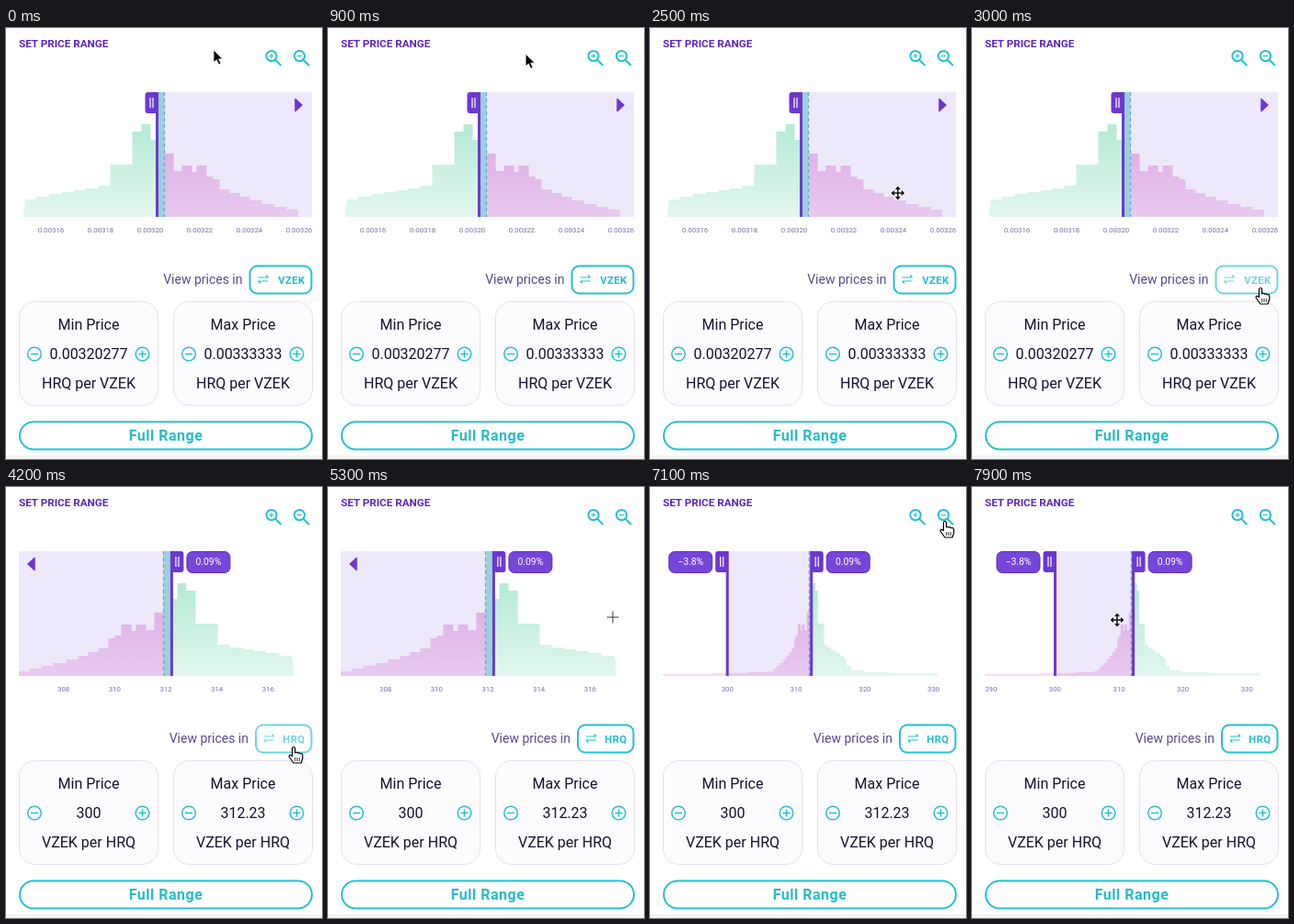
An HTML page that plays this animation: 344x470 px, repeating every 8000 ms.

```html
<!DOCTYPE html>
<html lang="en">
<head>
<meta charset="utf-8">
<title>Price range</title>
<style>
html, body { margin: 0; width: 100%; height: 100%; overflow: hidden; background: #fff; }
svg { display: block; width: 344px; height: 470px; font-family: Roboto, "Open Sans", sans-serif; }
.mid { text-anchor: middle; }
.end { text-anchor: end; }
.teal { fill: none; stroke: #25c0cf; stroke-width: 2; }
.card { fill: #fcfbfe; stroke: #e5e2ec; }
.ink { fill: #17122b; font-size: 16px; text-anchor: middle; }
.tick { fill: #7c6aa8; font-size: 7.8px; text-anchor: middle; }
.accent { fill: #24bccb; font-weight: 700; }
.grip { fill: #6c38cf; }
.tip { fill: #7645d9; stroke: #5a2cb8; }
</style>
</head>
<body>
<svg viewBox="0 0 344 470">
  <defs>
    <linearGradient id="green" gradientUnits="userSpaceOnUse" x1="0" y1="100" x2="0" y2="206">
      <stop stop-color="#b2e9d3"/><stop offset="1" stop-color="#e3f7ee"/>
    </linearGradient>
    <linearGradient id="pink" gradientUnits="userSpaceOnUse" x1="0" y1="130" x2="0" y2="206">
      <stop stop-color="#edbfe6"/><stop offset="1" stop-color="#f8dcf2"/>
    </linearGradient>
    <clipPath id="plot"><rect x="14" y="66" width="319" height="160"/></clipPath>
    <clipPath id="bars"><rect id="barsBox" y="70" width="299" height="136"/></clipPath>
  </defs>
  <rect width="344" height="470" fill="#fff"/>
  <rect y="466" width="344" height="4" fill="#f5f5f6"/>
  <text x="14" y="21" font-size="11.7" font-weight="700" fill="#5d25c6">SET PRICE RANGE</text>
  <g id="lenses" class="teal"></g>
  <g clip-path="url(#plot)">
    <g clip-path="url(#bars)">
      <path id="greenBars" fill="url(#green)"/>
      <path id="pinkBars" fill="url(#pink)"/>
    </g>
    <rect id="range" y="70" height="136" fill="#7645d9" opacity=".12"/>
    <rect id="band" y="70" height="136" fill="#9bd1da"/>
    <line id="current" y1="70" y2="206" stroke="#5fa9cf" stroke-width="1.2" stroke-dasharray="4 3"/>
    <g id="axis"></g>
  </g>
  <g id="handles"></g>
  <text id="viewText" class="end" y="279" font-size="14" fill="#5a4990">View prices in</text>
  <g id="toggle">
    <rect id="toggleBox" class="teal" y="259.5" height="30" rx="8" fill="#fff"/>
    <path id="toggleIcon" d="M0 272H11M8.5 269.5L11 272M11 276H0M2.5 278.5L0 276" class="teal" style="stroke-width:1.2"/>
    <text id="toggleText" class="end accent" x="325.5" y="278.5" font-size="11.3" letter-spacing=".4"></text>
  </g>
  <g id="cards"></g>
  <rect class="teal" x="15" y="429.5" width="318" height="30" rx="15"/>
  <text class="mid accent" x="174" y="450" font-size="16" letter-spacing=".5">Full Range</text>
  <g id="pointer"></g>
</svg>
<script>
const LOOP = 8000, FRAME = 100, SWITCH = 3600;
const LEFT = 14, RIGHT = 333, TOP = 70, BASE = 206, CENTER = 174;
const ZOOMS = [6200, 6900], ZOOM_TIME = 250;
const COIN = "HRQ", CASH = "VZEK";
const $ = id => document.getElementById(id);
const set = (id, attrs) => { for (const k in attrs) $(id).setAttribute(k, attrs[k]); };
const clamp = (v, a = 0, b = 1) => Math.min(b, Math.max(a, v));
const smooth = p => p * p * (3 - 2 * p);

// Liquidity steps: distance from the current price, then bar height
const GREEN = [[0, 84], [15, 101], [25, 93], [35, 57], [59, 34], [72, 31], [86, 29], [98, 27], [112, 25],
  [126, 22], [140, 19], [152, 11], [170, 6], [220, 4], [330, 3]];
const PINK = [[0, 69], [10, 50], [19, 56], [30, 49], [35, 56], [46, 44], [53, 41], [60, 30], [71, 26],
  [82, 22], [93, 18], [106, 14], [120, 11], [133, 8], [146, 5], [170, 4], [250, 3], [400, 2]];

function barPath(steps, origin, dir, zoom) {
  let d = `M${origin} ${BASE}`;
  steps.forEach(([u, h], i) => {
    const next = i + 1 < steps.length ? steps[i + 1][0] : 1500;
    d += `L${origin + dir * u * zoom} ${BASE - h}L${origin + dir * next * zoom} ${BASE - h}`;
  });
  return d + `V${BASE}Z`;
}

function handle(x, dir, label) {
  const grip = `M${x} ${TOP}h${10 * dir}q${3 * dir} 0 ${3 * dir} 3v17q0 3 ${-3 * dir} 3h${-10 * dir}z`;
  const tip = x + dir * 40;
  return `<rect class="grip" x="${x - 1.5}" y="${TOP}" width="3" height="136"/><path class="grip" d="${grip}"/>
    <path d="M${x + 4.5 * dir} 76v11M${x + 7.5 * dir} 76v11" stroke="#fff" stroke-width="1.2"/>` +
    (label ? `<rect class="tip" x="${tip - 23.5}" y="70.5" width="47" height="23" rx="6"/>
    <text class="mid" x="${tip}" y="85.3" font-size="10.3" fill="#fff">${label}</text>` : "");
}

const edgeArrow = (x, dir) =>
  `<path class="grip" stroke="#6c38cf" stroke-width="1.5" stroke-linejoin="round" d="M${x} 84l${-7 * dir} -6.5v13z"/>`;

function card(x, title, value, unit) {
  const button = (cx, plus) => `<circle class="teal" style="stroke-width:1.5" cx="${cx}" cy="355.5" r="7.3"/>
    <path class="teal" style="stroke-width:1.5" d="M${cx - 4} 355.5h8${plus ? `M${cx} 351.5v8` : ""}"/>`;
  return `<rect class="card" x="${x + .5}" y="298.5" width="151" height="113" rx="17"/>
    <text class="ink" x="${x + 76}" y="329">${title}</text>
    <text class="ink" x="${x + 76}" y="361">${value}</text>
    <text class="ink" x="${x + 76}" y="392.5">${unit}</text>` + button(x + 17, false) + button(x + 134.5, true);
}

const lens = (x, plus) => `<circle cx="${x}" cy="30.5" r="5.6"/><path d="M${x + 4} 34.5l6.5 6.5"/>
  <path stroke-width="1" style="stroke-width:1.2" d="M${x - 2.5} 30.5h5${plus ? `M${x} 28v5` : ""}"/>`;

const POINTERS = {
  arrow: `<path d="M0 0V13.5L3.2 10.7L5.6 16L8 15L5.6 9.8H10z" fill="#000" stroke="#fff" stroke-width=".8"/>`,
  hand: `<path d="M-1.5 1.5Q0 -1 1.6 1.5V7Q3 5.4 4.4 7.2Q6 6 7 7.8Q9.5 7 9.8 9.5V13L8 18H0L-5 11Q-5 8 -1.5 10.5z"
    fill="#fff" stroke="#000" stroke-width="1.2" stroke-linejoin="round"/><path d="M1.7 12v4M4 12v4M6.3 12v4" stroke="#000" stroke-width=".8"/>`,
  cross: `<path d="M-6.5 0H6.5M0 -6.5V6.5" stroke="#333" stroke-width="1"/>`,
  move: ["#fff", "#111"].map((c, i) => `<path d="M-6 0H6M0 -6V6M-4 -2.2L-6.3 0L-4 2.2M4 -2.2L6.3 0L4 2.2M-2.2 -4L0 -6.3L2.2 -4M-2.2 4L0 6.3L2.2 4"
    fill="none" stroke="${c}" stroke-width="${i ? 1.5 : 3.5}"/>`).join("")
};

// time, x, y
const ROUTE = [[0, 226, 24], [1700, 206, 32], [2000, 208, 36], [2900, 314, 283], [4500, 313, 283],
  [5100, 310, 142], [5400, 310, 142], [5900, 321, 37], [7200, 321, 37], [7800, 158, 145], [8000, 158, 145]];

function pointerAt(t) {
  const i = ROUTE.findIndex((p, n) => n && t <= p[0]);
  const [t0, x0, y0] = ROUTE[i - 1], [t1, x1, y1] = ROUTE[i];
  const p = smooth((t - t0) / (t1 - t0));
  return [x0 + (x1 - x0) * p, y0 + (y1 - y0) * p];
}

function ticks(flipped, toX, scale) {
  const step = flipped ? (scale > 20 ? 2 : scale > 10 ? 5 : 10) : 0.00002;
  const first = flipped ? 270 : 0.00316;
  let out = "";
  for (let i = 0; i < 60; i++) {
    const value = first + i * step, x = toX(value);
    if (x > LEFT && x < RIGHT)
      out += `<text class="tick" x="${x}" y="222.5">${flipped ? value : value.toFixed(5)}</text>`;
  }
  return out;
}

function render(t) {
  const flipped = t >= SWITCH, dir = flipped ? 1 : -1;
  const steps = ZOOMS.reduce((sum, z) => sum + smooth(clamp((t - z) / ZOOM_TIME)), 0);
  const zoom = 2 ** -steps, scale = 27.85 * zoom;
  const toX = flipped ? v => CENTER + (v - 312) * scale : v => 157 + (v - 0.0032) * 2.7e6;
  const now = flipped ? toX(311.91) : 172.5;
  const low = toX(flipped ? 300 : 0.00320277), high = toX(flipped ? 312.23 : 0.00333333);
  const from = clamp(low, LEFT, RIGHT), to = clamp(high, LEFT, RIGHT);
  const edge = flipped ? high : low;

  set("barsBox", { x: flipped ? 14 : 19 });
  set("greenBars", { d: barPath(GREEN, now, dir, zoom) });
  set("pinkBars", { d: barPath(PINK, now, -dir, zoom) });
  set("range", { x: from, width: to - from });
  set("band", { x: Math.min(edge, now), width: Math.abs(edge - now) });
  set("current", { x1: now, x2: now });
  $("axis").innerHTML = ticks(flipped, toX, scale);
  $("handles").innerHTML =
    (low > LEFT ? handle(low, -1, flipped ? "−3.8%" : "") : edgeArrow(24, -1)) +
    (high < RIGHT ? handle(high, 1, "0.09%") : edgeArrow(322, 1));

  const boxX = flipped ? 272 : 265.5;
  const [x, y] = pointerAt(t);
  const overToggle = x > boxX && x < RIGHT && y > 259 && y < 290;
  const overLens = x > 281 && x < 332 && y > 23 && y < 44;
  const overPlot = x > LEFT && x < RIGHT && y > TOP && y < BASE;
  const kind = overToggle || overLens ? "hand" : overPlot ? (x > from && x < to ? "move" : "cross") : "arrow";

  set("viewText", { x: boxX - 8 });
  set("toggle", { opacity: overToggle ? 0.65 : 1 });
  set("toggleBox", { x: boxX, width: 332.5 - boxX });
  set("toggleIcon", { transform: `translate(${boxX + 9} 0)` });
  $("toggleText").textContent = flipped ? COIN : CASH;
  const unit = flipped ? `${CASH} per ${COIN}` : `${COIN} per ${CASH}`;
  $("cards").innerHTML = card(14, "Min Price", flipped ? "300" : "0.00320277", unit) +
    card(182, "Max Price", flipped ? "312.23" : "0.00333333", unit);
  set("pointer", { transform: `translate(${x} ${y})` });
  $("pointer").innerHTML = POINTERS[kind];
}

$("lenses").innerHTML = lens(289, true) + lens(319.5, false);
let start;
function tick(now) {
  start ??= now;
  render(Math.floor(((now - start) % LOOP) / FRAME) * FRAME);
  requestAnimationFrame(tick);
}
render(0);
requestAnimationFrame(tick);
</script>
</body>
</html>
```
